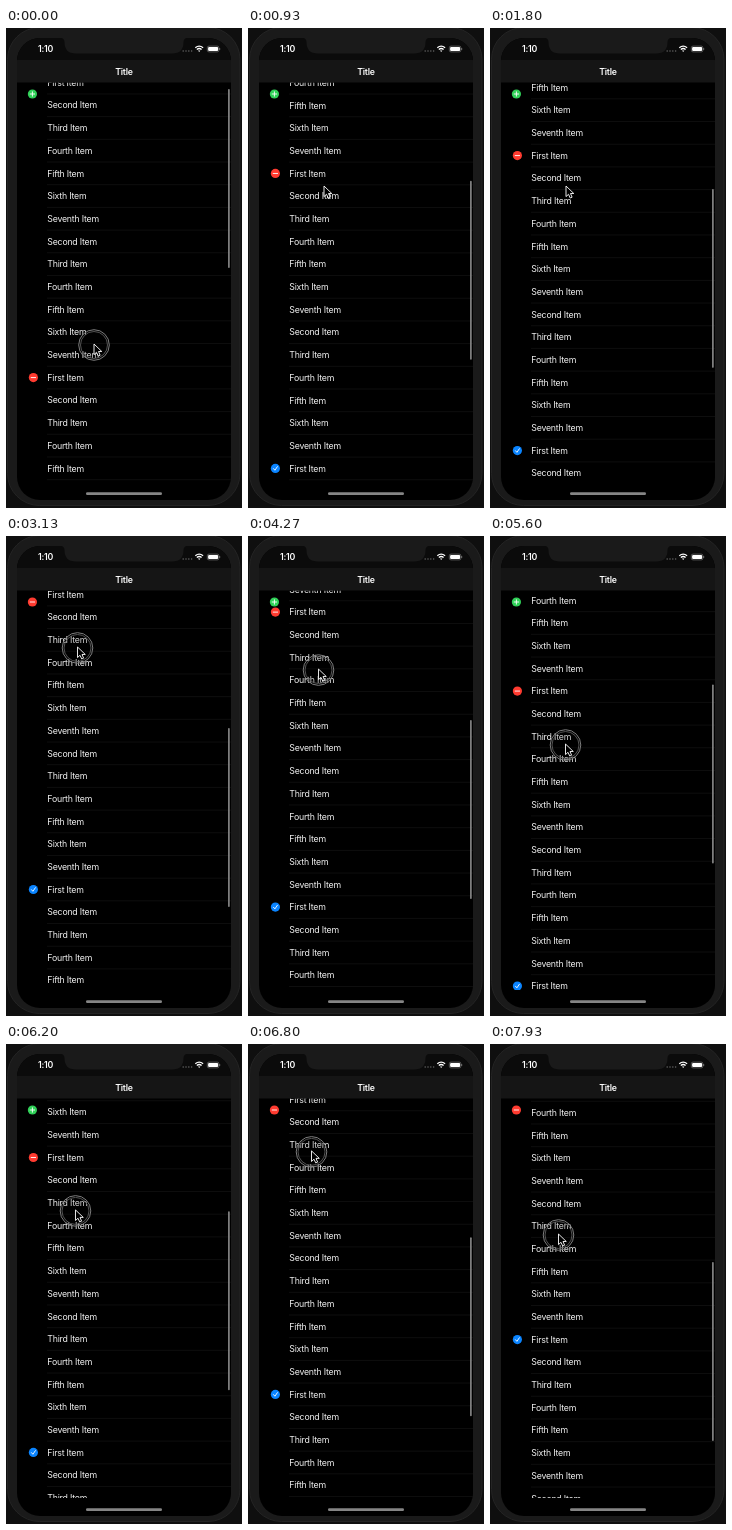
Animation, 236 px wide and 480 px high, one loop 8 s. Source, as an HTML page:

```html
<!DOCTYPE html>
<html lang="en">
<head>
<meta charset="utf-8">
<title>Title</title>
<style>
  html, body { margin: 0; width: 100%; height: 100%; overflow: hidden; background: #0f0f0f; }
  svg { display: block; width: 236px; height: 480px; }
  text { font-family: Inter, Roboto, sans-serif; font-size: 8.77px; letter-spacing: -.22px; fill: #f2f2f2; }
  .bold { font-weight: 600; fill: #fff; }
</style>
</head>
<body>
<svg viewBox="0 0 236 480" xmlns="http://www.w3.org/2000/svg">
  <defs>
    <clipPath id="screen"><rect x="11" y="10" width="214" height="462" rx="23"/></clipPath>
    <clipPath id="view"><rect x="11" y="54.5" width="214" height="399.5"/></clipPath>
  </defs>

  <rect width="236" height="480" fill="#0f0f0f"/>
  <rect x="1.5" y="-.5" width="232.5" height="478" rx="32" fill="#1a1a1a" stroke="#242424"/>
  <g clip-path="url(#screen)">
    <rect x="11" y="10" width="214" height="462" fill="#000"/>
    <g clip-path="url(#view)">
      <g id="rows"></g>
      <g id="badges"></g>
    </g>
    <rect x="11" y="10" width="214" height="22" fill="#0b0b0b"/>
    <rect x="11" y="32" width="214" height="22.5" fill="#151515"/>
  </g>
  <path d="M54 9.5Q58.500 10 58.500 14Q58.500 25.500 70 25.500H166Q177.500 25.500 177.500 14Q177.500 10 182 9.500Z" fill="#1a1a1a"/>

  <text class="bold" x="32" y="24.300">1:10</text>
  <text class="bold" x="118" y="46.700" text-anchor="middle">Title</text>
  <g fill="#666">
    <circle cx="177.200" cy="23" r=".75"/><circle cx="180" cy="23" r=".75"/>
    <circle cx="182.800" cy="23" r=".75"/><circle cx="185.600" cy="23" r=".75"/>
  </g>
  <g fill="none" stroke="#fff" stroke-width="1.300">
    <path d="M189.300 19.700Q193.200 16.400 197.100 19.700M190.800 21.500Q193.200 19.500 195.600 21.500"/>
    <path d="M192 22.600H194.400L193.200 24Z" fill="#fff" stroke="none"/>
  </g>
  <rect x="201.300" y="18.100" width="11.600" height="5.800" rx="1.700" fill="none" stroke="#888" stroke-width=".6"/>
  <rect x="202.100" y="18.900" width="10" height="4.200" rx="1" fill="#fff"/>
  <path d="M213.700 20V22" stroke="#888" stroke-width=".8"/>

  <rect id="bar" x="222.100" width="1.600" height="179" rx=".8" fill="#8c8c8c"/>
  <rect x="80" y="464.300" width="76" height="2.700" rx="1.350" fill="#858585"/>

  <g id="pointer">
    <g id="ring" fill="none">
      <circle cy="1" r="15.300" fill="#000" fill-opacity=".12" stroke="#7d7d7d" stroke-width="1"/>
      <circle cy="1" r="13.500" stroke="#5c5c5c" stroke-width=".9"/>
    </g>
    <path d="M0 0V10.600L2.500 8.300L4.200 12L6.100 11.200L4.500 7.500H7.800Z" fill="#000" stroke="#fff" stroke-width=".9" stroke-linejoin="round"/>
  </g>
</svg>

<script>
const LOOP = 8000, PITCH = 22.69, PER = 13, PIN = 66, START = 54.6;
const ORDINALS = ['First', 'Second', 'Third', 'Fourth', 'Fifth', 'Sixth', 'Seventh'];
const $ = id => document.getElementById(id);

function add(parent, tag, attrs, text) {
  const el = document.createElementNS('http://www.w3.org/2000/svg', tag);
  for (const key in attrs) el.setAttribute(key, attrs[key]);
  if (text) el.textContent = text;
  parent.appendChild(el);
  return el;
}

for (let i = 0; i < PER * 3; i++) {
  const n = i % PER, y = i * PITCH;
  add($('rows'), 'text', { x: 41.3, y: y + 3.2 }, ORDINALS[n < 7 ? n : n - 6] + ' Item');
  add($('rows'), 'path', { d: `M41 ${y + PITCH / 2}H225`, stroke: '#1c1c1c', 'stroke-width': .5 });
}

const badges = [
  ['#30d158', 'M-2.200 0H2.200M0 -2.200V2.200'],
  ['#ff3b30', 'M-2.200 0H2.200'],
  ['#0a84ff', 'M-1.900 .2L-.5 1.800L2 -1.800']
].map(([fill, d]) => {
  const g = add($('badges'), 'g', {});
  add(g, 'circle', { r: 4.6, fill });
  add(g, 'path', { d, fill: 'none', stroke: '#fff', 'stroke-width': .9, 'stroke-linecap': 'round' });
  return g;
});

// [time, value] tracks, joined by monotone cubics
const scroll = [[70, 0], [600, 158], [900, 202], [1200, 216], [1530, 222], [2050, 222],
  [2600, 276], [2800, 284], [3000, 284], [3130, 291], [3330, 296], [3730, 296],
  [4270, 273.5], [5000, 215], [5600, 194.5], [6200, 236], [6800, 294],
  [6920, 312], [7060, 362], [7200, 385], [7470, 385], [7930, 349]];
const pointerY = [[70, 316], [600, 158], [1800, 158], [2050, 180], [2600, 126], [2800, 118],
  [3000, 118], [3130, 111], [3330, 106], [3730, 106], [4270, 133], [5000, 188],
  [5600, 208], [6200, 166], [6800, 107], [6920, 90], [7200, 154], [7470, 154], [7930, 190]];
const pointerX = [[70, 88], [600, 76], [1800, 76], [3130, 71.5], [4270, 70.5],
  [5600, 75.5], [6800, 63.5], [7200, 67], [7930, 68.5]];
const released = [[640, 2050], [6930, 7440]];

function sample(track, t) {
  const last = track.length - 1;
  if (t <= track[0][0]) return track[0][1];
  if (t >= track[last][0]) return track[last][1];
  const k = track.findIndex(p => p[0] > t) - 1;
  const slope = i => (track[i + 1][1] - track[i][1]) / (track[i + 1][0] - track[i][0]);
  const tangent = i => {
    if (i === 0) return slope(0);
    if (i === last) return slope(last - 1);
    const a = slope(i - 1), b = slope(i);
    return a * b > 0 ? 2 * a * b / (a + b) : 0;
  };
  const [t0, v0] = track[k], [t1, v1] = track[k + 1];
  const h = t1 - t0, u = (t - t0) / h, w = 1 - u;
  return v0 * (1 + 2 * u) * w * w + v1 * u * u * (3 - 2 * u)
    + h * u * w * (tangent(k) * w - tangent(k + 1) * u);
}

const move = (el, x, y) => el.setAttribute('transform', `translate(${x.toFixed(2)} ${y.toFixed(2)})`);

function draw(t) {
  const s = sample(scroll, t), top = START - s;
  move($('rows'), 0, top);
  badges.forEach((badge, i) => {
    const y = top + i * PER * PITCH, next = y + PER * PITCH;
    const pinned = y < PIN;
    move(badge, pinned ? 26.4 : 27.4, pinned ? PIN : y);
    badge.setAttribute('visibility', next <= PIN ? 'hidden' : 'visible');
  });
  $('bar').setAttribute('y', 61 + s * .45);
  move($('pointer'), sample(pointerX, t), sample(pointerY, t));
  const up = released.some(([a, b]) => t >= a && t < b);
  $('ring').setAttribute('visibility', up ? 'hidden' : 'visible');
}

const began = performance.now();
function tick() {
  draw((performance.now() - began) % LOOP);
  requestAnimationFrame(tick);
}
draw(0);
requestAnimationFrame(tick);
</script>
</body>
</html>
```
